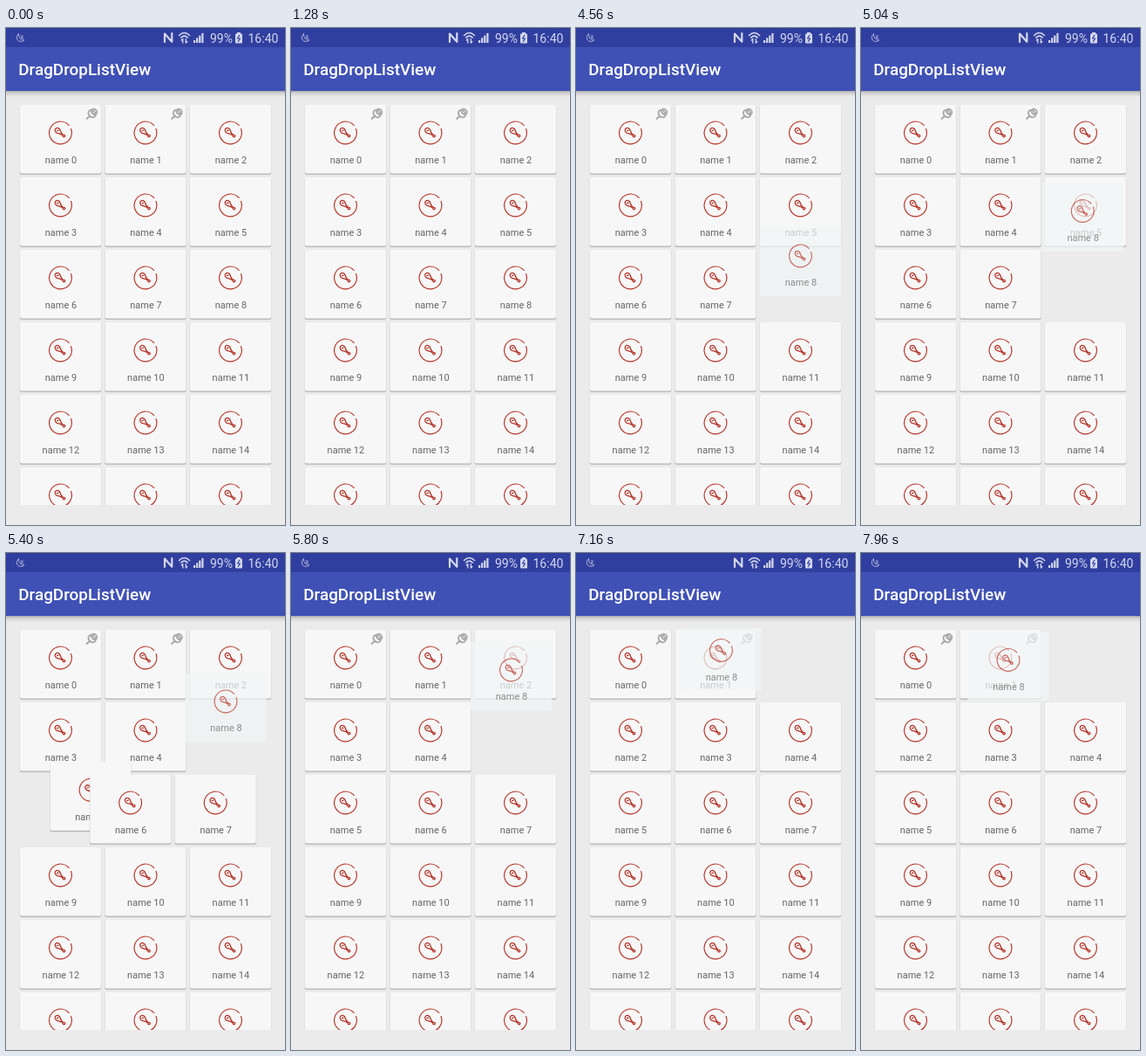
Recreate the animation shown at these times as an HTML page with a canvas. Size 320 by 569 pixels, loop 8 s.

```html
<!DOCTYPE html>
<html lang="en">
<head>
<meta charset="utf-8">
<title>DragDropListView</title>
<style>
html, body { margin: 0; width: 100%; height: 100%; overflow: hidden; background: #ebebec; }
canvas { display: block; width: 320px; height: 569px; }
</style>
</head>
<body>
<canvas id="stage"></canvas>
<script>
const W = 320, H = 569, LOOP = 8000;
const CARD_W = 93, CARD_H = 78.5;
const DRAG_START = 3200, DRAGGED = 8;
const RED = '#b5352a';
const FONT = 'Roboto, sans-serif';

// time, x offset, y offset of the dragged card
const dragPath = [
  [4040, 0, 0], [4560, 0, -25], [5000, -3, -72], [5400, -5.5, -116],
  [5800, -5, -152], [6160, -3.5, -164], [6450, -14, -168], [6800, -66, -174],
  [7160, -91, -174.5], [7500, -91, -169], [7960, -88.5, -163.5]
];

const canvas = document.getElementById('stage');
const scale = window.devicePixelRatio || 1;
canvas.width = W * scale;
canvas.height = H * scale;
const ctx = canvas.getContext('2d');

const clamp01 = v => Math.max(0, Math.min(1, v));
const ease = (t, start) => (1 - Math.cos(Math.PI * clamp01((t - start) / 300))) / 2;
const cell = n => ({ x: 16 + (n % 3) * 97.5, y: 88 + Math.floor(n / 3) * 83 });

function text(str, x, y, size, color, align = 'left', weight = 400) {
  ctx.font = `${weight} ${size}px ${FONT}`;
  ctx.textAlign = align;
  ctx.fillStyle = color;
  ctx.fillText(str, x, y);
}

function rect(x, y, w, h, color) {
  ctx.fillStyle = color;
  ctx.fillRect(x, y, w, h);
}

function rounded(x, y, w, h, r, color) {
  ctx.beginPath();
  ctx.roundRect(x, y, w, h, r);
  ctx.fillStyle = color;
  ctx.fill();
}

function stroke(path, color, width) {
  ctx.strokeStyle = color;
  ctx.lineWidth = width;
  ctx.lineCap = ctx.lineJoin = 'round';
  ctx.stroke(new Path2D(path));
}

function ring(x, y, rx, ry, angle, color, width) {
  ctx.beginPath();
  ctx.ellipse(x, y, rx, ry, angle, 0, Math.PI * 2);
  ctx.strokeStyle = color;
  ctx.lineWidth = width;
  ctx.stroke();
}

function at(x, y, draw) {
  ctx.save();
  ctx.translate(x, y);
  draw();
  ctx.restore();
}

function drawFoodIcon() {
  ctx.beginPath();
  ctx.arc(0, 0, 12.9, -0.36, Math.PI * 2 - 0.72);
  ctx.strokeStyle = RED;
  ctx.lineWidth = 1.15;
  ctx.lineCap = 'round';
  ctx.stroke();
  stroke('M-5.8 -4.6 C-3.8 -6.4 -1 -5.4 -.4 -3 C0 -1.2 .6 .2 2.6 2 L1.8 2.6 C.2 1.2 -1.2 1 -3 .7 C-5.8 .2 -7 -2.8 -5.8 -4.6 Z', RED, 1.3);
  stroke('M-4 -2.4 L-2.4 -2.8', RED, 1.2);
  ring(4, 3.6, 1.3, 1.3, 0, RED, 1.3);
}

function drawPin() {
  const gray = '#a9a9a9';
  stroke('M-6.3 5.8 L-3.2 3', gray, 2.1);
  ring(-.4, .2, 4.6, 3.6, Math.PI / 4, gray, 1.9);
  ring(2.2, -2.2, 3.4, 2.7, Math.PI / 4, gray, 1.9);
}

function drawContent(n) {
  at(46.5, 32, drawFoodIcon);
  text('name ' + n, 46.9, 66.5, 11, '#666', 'center');
}

function drawCard(n, x, y) {
  at(x, y, () => {
    rounded(-.6, .4, CARD_W + 1.2, CARD_H + 1.4, 2.5, 'rgba(0,0,0,.07)');
    rounded(0, .8, CARD_W, CARD_H + .4, 2, 'rgba(0,0,0,.17)');
    rounded(0, 0, CARD_W, CARD_H, 2, '#f7f7f7');
    drawContent(n);
    if (n < 2) at(83, 10, drawPin);
  });
}

function drawDragged(x, y) {
  at(x, y, () => {
    ctx.globalAlpha = .72;
    rect(0, 0, CARD_W, CARD_H, '#f1f6f5');
    drawContent(DRAGGED);
  });
}

// Cubic Hermite through the path points, level at both ends
function dragOffset(t) {
  const last = dragPath.length - 1;
  if (t <= dragPath[0][0]) return [0, 0];
  if (t >= dragPath[last][0]) return dragPath[last].slice(1);
  const i = dragPath.findIndex(p => p[0] > t) - 1;
  const a = dragPath[i], b = dragPath[i + 1];
  const span = b[0] - a[0], u = (t - a[0]) / span;
  const slope = (k, axis) => {
    if (k === 0 || k === last) return 0;
    const p = dragPath[k - 1], q = dragPath[k + 1];
    return (q[axis] - p[axis]) / (q[0] - p[0]) * span;
  };
  return [1, 2].map(axis =>
    a[axis] * (1 + 2 * u) * (1 - u) ** 2 + b[axis] * u * u * (3 - 2 * u) +
    slope(i, axis) * u * (1 - u) ** 2 - slope(i + 1, axis) * u * u * (1 - u));
}

function drawGrid(t) {
  ctx.save();
  ctx.beginPath();
  ctx.rect(14, 86, 292, 460);
  ctx.clip();
  const lowerShift = ease(t, 5184), upperShift = ease(t, 5959);
  for (let n = 0; n < 18; n++) {
    if (n === DRAGGED && t >= DRAG_START) continue;
    const shift = n >= 5 && n <= 7 ? lowerShift : n >= 2 && n <= 4 ? upperShift : 0;
    const from = cell(n), to = cell(n + 1);
    drawCard(n, from.x + (to.x - from.x) * shift, from.y + (to.y - from.y) * shift);
  }
  if (t >= DRAG_START) {
    const home = cell(DRAGGED), [dx, dy] = dragOffset(t);
    drawDragged(home.x + dx, home.y + dy);
  }
  ctx.restore();
}

function drawStatusBar() {
  const light = '#d3d7ee';
  rect(0, 0, W, 22, '#303f9f');
  stroke('M14.5 6.8 C11.8 8.5 11.5 13 14.5 14.8 C16.8 16 19.5 15.5 21 13.6 C17.5 14 14 11.5 14.5 6.8 Z', '#b9bfe2', .9);
  stroke('M17 9 L19.5 9 L17.2 11.5 L19.7 11.5', '#b9bfe2', .8);
  stroke('M182 16 L182 6.5 L190.3 15.8 L190.3 6', light, 2.2);
  stroke('M198.5 8.5 Q204.5 2.5 210.5 8.5 M200.7 11 Q204.5 7.2 208.3 11', light, 1.5);
  stroke('M202.8 17 L202.8 12.5 L201.3 14 M206.3 12.5 L206.3 17 L207.8 15.5', light, 1.3);
  for (let i = 0; i < 4; i++) {
    const h = 3 + i * 2.7;
    rect(215 + i * 3.1, 17 - h, 2.2, h, light);
  }
  text('99%', 234, 17, 14, light);
  rect(265, 5, 4, 2, light);
  rounded(263, 6.5, 8, 11, 1, light);
  stroke('M267.7 8.5 L265.5 12 L268.5 12 L266.3 15.5', '#303f9f', 1.2);
  text('16:40', 277.5, 17, 14, light);
}

function drawAppBar() {
  rect(0, 22, W, 50, '#3f51b5');
  text('DragDropListView', 14.2, 54, 18.9, '#fff', 'left', 500);
  const shade = ctx.createLinearGradient(0, 72, 0, 79);
  shade.addColorStop(0, 'rgba(0,0,0,.28)');
  shade.addColorStop(.4, 'rgba(0,0,0,.1)');
  shade.addColorStop(1, 'rgba(0,0,0,0)');
  rect(0, 72, W, 7, shade);
}

function render(now) {
  const t = now % LOOP;
  ctx.setTransform(scale, 0, 0, scale, 0, 0);
  rect(0, 0, W, H, '#ebebec');
  drawGrid(t);
  drawStatusBar();
  drawAppBar();
}

const start = performance.now();
function tick() {
  render(performance.now() - start);
  requestAnimationFrame(tick);
}
tick();
</script>
</body>
</html>
```
